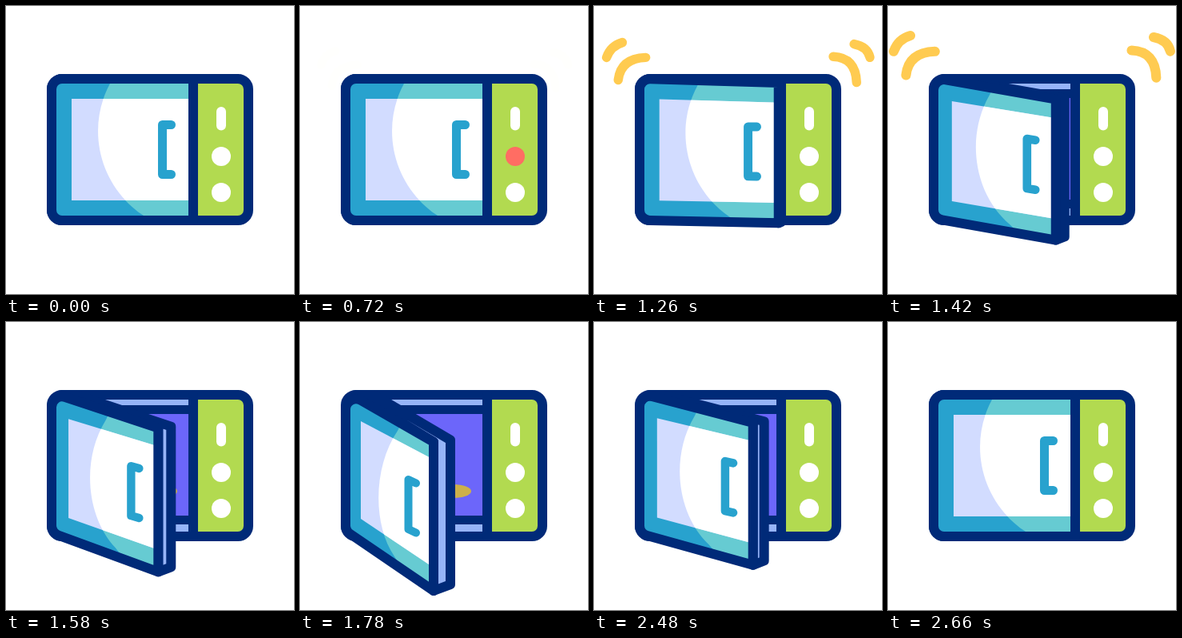
An HTML page with a canvas that plays this animation: 360 px wide and 360 px high, repeating every 3.6 s.

```html
<!DOCTYPE html>
<html lang="en">
<head>
<meta charset="utf-8">
<title>Microwave</title>
<style>
  html, body { margin: 0; width: 100%; height: 100%; overflow: hidden; background: #fff; }
  canvas { display: block; width: 360px; height: 360px; }
</style>
</head>
<body>
<canvas id="stage"></canvas>
<script>
const LOOP = 3600;
const NAVY = '#002a78', TEAL = '#28a2ce', AQUA = '#66cbd2', LAVENDER = '#d2dcff';
const STEEL = '#96b4f8', PURPLE = '#6c66fa', GREEN = '#b2da50', YELLOW = '#ffcb50';

const canvas = document.getElementById('stage');
const ctx = canvas.getContext('2d');
const dpr = window.devicePixelRatio || 1;
canvas.width = canvas.height = 360 * dpr;
ctx.scale(dpr, dpr);
ctx.lineCap = ctx.lineJoin = 'round';

const lerp = (a, b, u) => a + (b - a) * u;
const mix = (p, q, u) => p.map((v, i) => lerp(v, q[i], u));
const ramp = (t, from, to) => Math.min(1, Math.max(0, (t - from) / (to - from)));

function fill(path, color) {
  ctx.fillStyle = color;
  ctx.fill(path);
}

function stroke(path, color, width) {
  ctx.strokeStyle = color;
  ctx.lineWidth = width;
  ctx.stroke(path);
}

function rect(x, y, w, h, color) {
  ctx.fillStyle = color;
  ctx.fillRect(x, y, w, h);
}

function dot(x, y, color) {
  const p = new Path2D();
  p.arc(x, y, 12, 0, 7);
  fill(p, color);
}

function poly(points) {
  const p = new Path2D();
  points.forEach(q => p.lineTo(...q));
  p.closePath();
  return p;
}

function clipped(clip, path, color) {
  ctx.save();
  ctx.clip(clip);
  fill(path, color);
  ctx.restore();
}

const shell = new Path2D();
shell.roundRect(57, 91, 246, 177, 13);

function drawBody(t) {
  fill(shell, PURPLE);
  rect(63, 97, 168, 8, STEEL);
  rect(63, 104, 168, 11, NAVY);
  rect(63, 242, 168, 11, NAVY);
  rect(63, 253, 168, 10, STEEL);

  const plate = new Path2D();
  plate.ellipse(192, 211.5, 22, 8.5, 0, 0, 7);
  fill(plate, t < 2340 ? '#cdb04a' : GREEN);

  ctx.save();
  ctx.clip(shell);
  rect(234, 91, 70, 177, GREEN);
  ctx.restore();
  stroke(shell, NAVY, 12);
  stroke(new Path2D('M234 91V268'), NAVY, 12);

  stroke(new Path2D('M269 132V149.5'), '#fff', 12);
  const red = ramp(t, 0, 160) * (1 - ramp(t, 720, 900));
  const tone = mix([255, 255, 255], [255, 108, 98], red).map(Math.round);
  dot(269, 188, `rgb(${tone})`);
  dot(269, 233, '#fff');
}

// u: 0 closed, 1 fully open
function drawDoor(u) {
  const drop = 59 * Math.pow(u, 0.82);
  const edge = 234 - 67 * u, top = 91 + drop, bottom = 268 + 68 * u;
  const hingeTop = 91 - 4 * u, hingeBottom = 268 - 7 * u;
  const thick = 21 * Math.pow(u, 0.64);

  if (u > 0) {
    const back = edge + thick;
    const rim = poly([
      [70, 91], [70 + 1.05 * thick, 91], [back, top - 0.12 * thick],
      [back, bottom - 0.38 * thick], [edge, bottom], [edge, top]
    ]);
    fill(rim, STEEL);
    stroke(rim, NAVY, 12);
  }

  const face = new Path2D();
  face.moveTo(edge, top);
  face.arcTo(57, hingeTop, 57, 180, 13);
  face.arcTo(57, hingeBottom, edge, bottom, 13);
  face.lineTo(edge, bottom);
  face.closePath();

  const pane = poly([
    mix([82, 116], [76, 124], u), [edge, 116 + 0.95 * drop],
    [edge, 243 + 64 * u], mix([82, 243], [76, 246], u)
  ]);

  // curved reflection, spreading right from its left rim
  const glare = new Path2D();
  glare.moveTo(300, 60);
  glare.lineTo(...mix([146, 60], [140, 100], u));
  glare.lineTo(...mix([130, 97], [122, 136], u));
  glare.bezierCurveTo(
    ...mix([99, 154.4], [92, 180], u),
    ...mix([117.7, 226], [90, 252], u),
    ...mix([172, 262], [118, 293], u));
  glare.lineTo(...mix([188, 272], [136, 322], u));
  glare.lineTo(188, 360);
  glare.lineTo(300, 360);
  glare.closePath();

  fill(face, TEAL);
  clipped(face, glare, AQUA);
  fill(pane, LAVENDER);
  clipped(pane, glare, '#fff');
  stroke(face, NAVY, 12);

  const x = 195.5 - 60 * u, y1 = 148.5 + 48.5 * u, y2 = 210.5 + 48.5 * u;
  const hook = 11 - 1.5 * u, tilt = 4.5 * u;
  const handle = new Path2D();
  handle.moveTo(x + hook, y1 + tilt);
  handle.lineTo(x, y1);
  handle.lineTo(x, y2);
  handle.lineTo(x + hook, y2 + tilt);
  stroke(handle, TEAL, 11 - u);
}

// each pair of arcs grows around its own pivot while drifting outwards
const waves = [
  { path: new Path2D('M36 97Q39 71 69 70M22 70Q27 56 41 52'), pivot: [41, 52], dx: -13 },
  { path: new Path2D('M295 69Q322 70 323 100M320 54Q336 57 339 70'), pivot: [320, 54], dx: 12 }
];

function drawWaves(t) {
  const alpha = ramp(t, 720, 880) * (1 - ramp(t, 1420, 1540));
  if (!alpha) return;
  const out = t < 1240 ? lerp(-0.3, 0.35, ramp(t, 700, 1240))
                       : lerp(0.35, 1, ramp(t, 1240, 1420));
  const size = 1 + 0.1 * out;
  ctx.globalAlpha = alpha;
  for (const { path, pivot: [px, py], dx } of waves) {
    ctx.save();
    ctx.translate(px + dx * out, py - 15 * out);
    ctx.scale(size, size);
    ctx.translate(-px, -py);
    stroke(path, YELLOW, 11);
    ctx.restore();
  }
  ctx.globalAlpha = 1;
}

function draw(t) {
  rect(0, 0, 360, 360, '#fff');
  drawBody(t);
  drawDoor(Math.pow(ramp(t, 1240, 1780), 0.93) * (1 - ramp(t, 2320, 2660)));
  drawWaves(t);
}

const start = performance.now();
function tick() {
  draw((performance.now() - start) % LOOP);
  requestAnimationFrame(tick);
}
tick();
</script>
</body>
</html>
```
